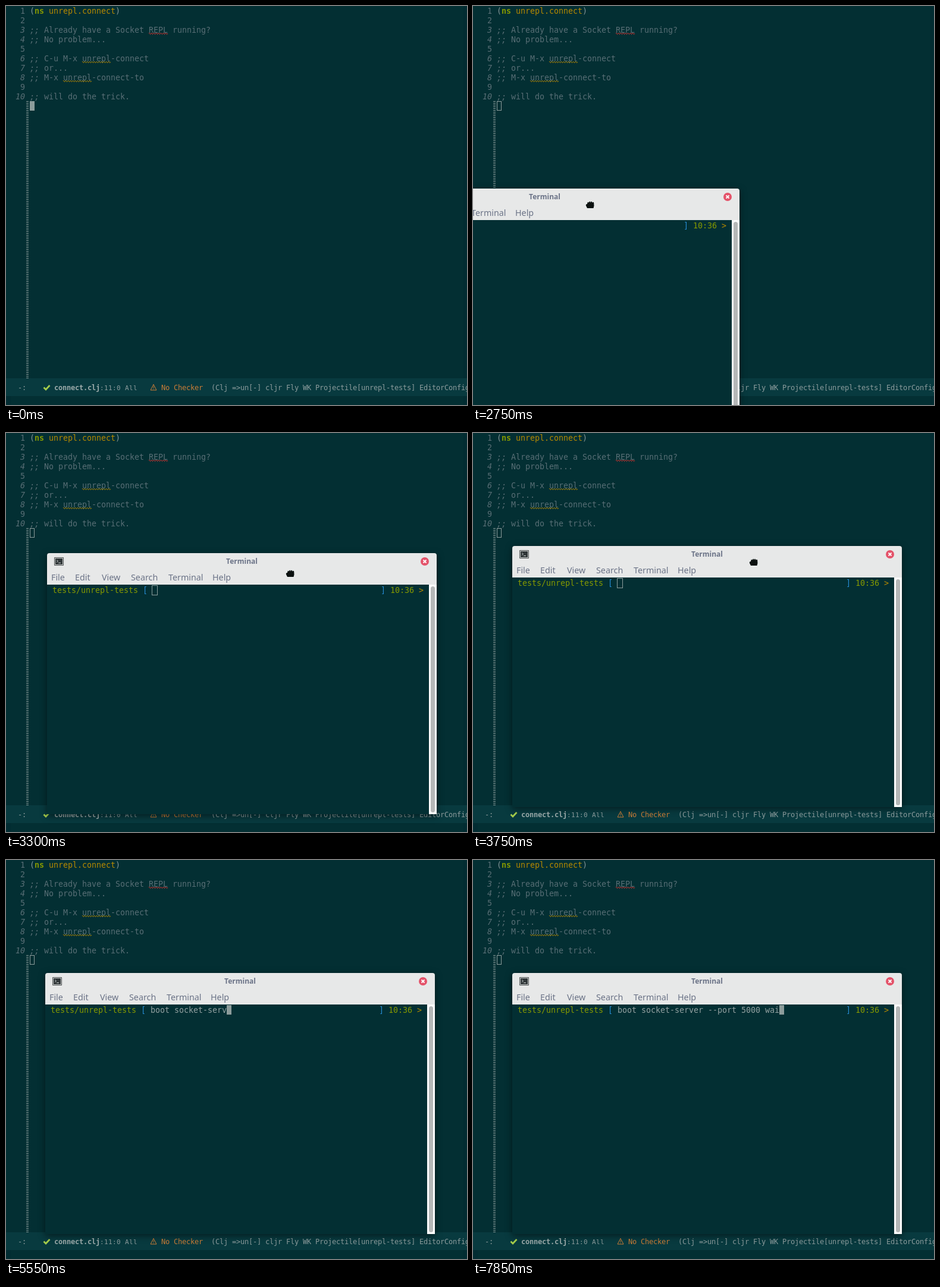
An HTML page with a canvas that plays this animation: 775 px wide and 671 px high, repeating every 8000 ms.

```html
<!DOCTYPE html>
<html lang="en">
<head>
<meta charset="utf-8">
<title>Editor and terminal</title>
<style>
  html, body { margin: 0; width: 100%; height: 100%; overflow: hidden; background: #032f33; }
  canvas { display: block; }
</style>
</head>
<body>
<canvas id="stage" width="775" height="671"></canvas>
<script>
const ctx = document.getElementById('stage').getContext('2d');
const W = 775, H = 671, LOOP = 8000, STEP = 50;
const CELL = 8, LINE = 16;
const WIN_W = 655, WIN_H = 439, HEADER = 53;

const C = {
  bg: '#032f33', fringe: '#022c32', bar: '#083a3f', text: '#839496', dim: '#586e75',
  green: '#859900', yellow: '#b58900', blue: '#268bd2', red: '#dc322f',
  orange: '#cb7d37', check: '#a5cc4b', cursor: '#8c9c9b', barText: '#8c9c9d',
  typed: '#93a1a1', chrome: '#e7e8e8', label: '#6b7387', close: '#e4536a'
};

const CODE = 13.333, BAR = 12, BAR_SMALL = 11;

const COMMENTS = {
  3: 'Already have a Socket REPL running?',
  4: 'No problem...',
  6: 'C-u M-x unrepl-connect',
  7: 'or...',
  8: 'M-x unrepl-connect-to',
  10: 'will do the trick.'
};
const MENU = [['File', 7], ['Edit', 47], ['View', 92], ['Search', 141], ['Terminal', 204], ['Help', 278]];

const COMMAND = 'boot socket-server --port 5000 wai';
const KEY_TIMES = [
  4250, 4350, 4400, 4500, 4550,
  4900, 4950, 5000, 5050, 5100, 5150, 5250, 5300, 5350, 5500, 5550,
  5900, 6050, 6100, 6250, 6350, 6400, 6450, 6550, 6600, 6750,
  6900, 7050, 7100, 7200, 7450, 7700, 7800, 7850
];

const DRAG_START = 2250, DROP = 4000;
// time, window x, window y
const DRAG = [[2250, -660, 480], [2750, -207, 307], [3050, 69, 202], [3300, 69, 202], [3700, 66, 190]];

function windowAt(t) {
  const i = DRAG.findIndex(k => k[0] > t);
  if (i < 0) return DRAG[DRAG.length - 1].slice(1);
  const [t0, x0, y0] = DRAG[i - 1], [t1, x1, y1] = DRAG[i];
  const p = (t - t0) / (t1 - t0);
  return [Math.round(x0 + (x1 - x0) * p), Math.round(y0 + (y1 - y0) * p)];
}

function rect(x, y, w, h, color) {
  ctx.fillStyle = color;
  ctx.fillRect(x, y, w, h);
}

// Monospaced text whose advance is rounded to whole pixels.
function mono(str, x, y, color, size = CODE, style = '') {
  const advance = size * 0.60205;
  ctx.font = `${style} ${size}px "DejaVu Sans Mono", monospace`;
  ctx.letterSpacing = `${Math.round(advance) - advance}px`;
  ctx.fillStyle = color;
  ctx.textAlign = 'left';
  ctx.fillText(str, x, y);
}

function sans(str, x, y, size, style = '', align = 'left') {
  ctx.font = `${style} ${size}px "Noto Sans", "Open Sans", sans-serif`;
  ctx.letterSpacing = '0px';
  ctx.fillStyle = C.label;
  ctx.textAlign = align;
  ctx.fillText(str, x, y);
}

function round(x, y, w, h, r, color) {
  ctx.beginPath();
  ctx.roundRect(x, y, w, h, r);
  ctx.fillStyle = color;
  ctx.fill();
}

function polyline(points, color, width) {
  ctx.beginPath();
  points.forEach(([x, y]) => ctx.lineTo(x, y));
  ctx.strokeStyle = color;
  ctx.lineWidth = width;
  ctx.stroke();
}

function outline(x, y, w, h, color) {
  ctx.strokeStyle = color;
  ctx.lineWidth = 1;
  ctx.strokeRect(x + 0.5, y + 0.5, w - 1, h - 1);
}

function squiggle(x, width, line, color) {
  const top = line * LINE - 3;
  for (let i = 0; i < width; i++) rect(x + i, top + 2 - Math.abs(i % 4 - 2), 1, 1, color);
}

function drawBuffer(focused) {
  rect(0, 0, W, H, C.bg);
  rect(769, 0, 6, H, C.fringe);
  for (let n = 1; n <= 10; n++) {
    const y = n * LINE - 3, comment = COMMENTS[n];
    mono(String(n), n < 10 ? 24 : 16, y, C.dim, CODE, comment ? 'italic' : '');
    if (comment) {
      mono(';;', 40, y, C.dim, CODE, 'italic');
      mono(comment, 64, y, C.dim);
    }
  }
  mono('(', 40, 13, C.text);
  mono('ns', 48, 13, C.green, CODE, 'bold');
  mono('unrepl.connect', 72, 13, C.yellow);
  mono(')', 184, 13, C.text);
  squiggle(240, 32, 3, C.red);
  squiggle(128, 48, 6, C.yellow);
  squiggle(96, 48, 8, C.yellow);
  for (let y = 160; y < 626; y += 3) rect(34, y, 4, 1, C.cursor);
  if (focused) rect(40, 160, 8, 16, C.cursor);
  else outline(40, 160, 8, 16, C.cursor);
}

function drawModeLine() {
  const y = 646;
  rect(0, 626, W, 30, C.bar);
  rect(0, 656, 8, 15, C.fringe);
  mono('-:', 20, y, C.barText, BAR);
  polyline([[63.5, 641.5], [67, 645], [73.5, 638]], C.check, 2.8);
  mono('connect.clj', 81, y, '#9aa9a9', BAR, 'bold');
  mono(':11:0 All', 158, y, C.barText, BAR_SMALL);
  polyline([[248, 636.5], [253, 646], [243, 646], [248, 636.5], [248.5, 637.5]], C.orange, 1);
  rect(247.5, 639.5, 1, 3, C.orange);
  rect(247.5, 643.5, 1, 1, C.orange);
  mono('No Checker', 261, y, C.orange, BAR);
  mono('(Clj =>un[-] cljr Fly WK Projectile[unrepl-tests] EditorConfig', 345, y, C.barText, BAR);
}

function drawChrome() {
  ctx.save();
  ctx.shadowColor = 'rgba(0,0,0,.5)';
  ctx.shadowBlur = 12;
  ctx.shadowOffsetY = 3;
  round(0, 0, WIN_W, WIN_H, [4, 4, 0, 0], C.chrome);
  ctx.restore();

  round(12, 7, 16, 14, 1, '#4b4f50');
  rect(13, 8, 14, 12, '#d0d3d2');
  rect(14, 9, 12, 10, '#303638');
  polyline([[16, 11.5], [18.5, 13.5], [16, 15.5]], '#c4cac9', 1);
  rect(19, 16, 4, 1, '#c4cac9');

  sans('Terminal', 327.5, 18, 12, 'bold', 'center');
  MENU.forEach(([name, x]) => sans(name, x, 46, 14.3));

  ctx.beginPath();
  ctx.arc(635, 14, 7, 0, Math.PI * 2);
  ctx.fillStyle = C.close;
  ctx.fill();
  polyline([[632.5, 11.5], [637.5, 16.5]], '#fff', 1.8);
  polyline([[637.5, 11.5], [632.5, 16.5]], '#fff', 1.8);

  rect(0, HEADER, 642, WIN_H - HEADER, C.bg);
  rect(642, HEADER, 13, WIN_H - HEADER, '#fcfcfc');
  round(645, 56, 7, 380, 3.5, '#b5b7b7');
}

function drawPrompt(t) {
  const put = (str, col, color) => mono(str, 9 + col * CELL, 67, color);
  const typed = KEY_TIMES.filter(k => k <= t).length;
  const cursorX = 9 + (21 + typed) * CELL;
  put('tests/unrepl-tests', 0, C.green);
  put('[', 19, C.blue);
  put(COMMAND.slice(0, typed), 21, C.typed);
  put(']', 69, C.blue);
  put('10:36', 71, C.green);
  put('>', 77, C.yellow);
  if (t >= DROP) rect(cursorX, 54, 8, 16, C.cursor);
  else outline(cursorX - 1, 54, 10, 17, C.cursor);
}

function drawHand(x, y) {
  ctx.save();
  ctx.translate(x, y);
  ctx.beginPath();
  ctx.moveTo(3, 12);
  ctx.lineTo(1, 8);
  ctx.quadraticCurveTo(0, 5, 3, 5);
  for (let i = 0; i < 4; i++) {
    const left = 3 + i * 2.8, top = i === 1 || i === 2 ? 0.5 : 1.8;
    ctx.quadraticCurveTo(left + 0.2, top, left + 1.4, top);
    ctx.quadraticCurveTo(left + 2.6, top, left + 2.8, 3);
  }
  ctx.lineTo(14.5, 8);
  ctx.lineTo(13.5, 12);
  ctx.closePath();
  ctx.strokeStyle = '#e9eeee';
  ctx.lineWidth = 1.6;
  ctx.stroke();
  ctx.fillStyle = '#0c1110';
  ctx.fill();
  ctx.restore();
}

function draw(t) {
  drawBuffer(t < DRAG_START);
  drawModeLine();
  if (t < DRAG_START) return;
  const [x, y] = windowAt(t);
  ctx.save();
  ctx.translate(x, y);
  drawChrome();
  drawPrompt(t);
  ctx.restore();
  if (t < DROP) {
    const lag = t >= 3050 && t < 3500;
    drawHand(x + (lag ? 401 : t < 3050 ? 396 : 398), y + (lag ? 28 : 21));
  }
}

const start = performance.now();
function tick() {
  const t = (performance.now() - start) % LOOP;
  draw(Math.floor(t / STEP) * STEP);
  requestAnimationFrame(tick);
}
tick();
</script>
</body>
</html>
```
